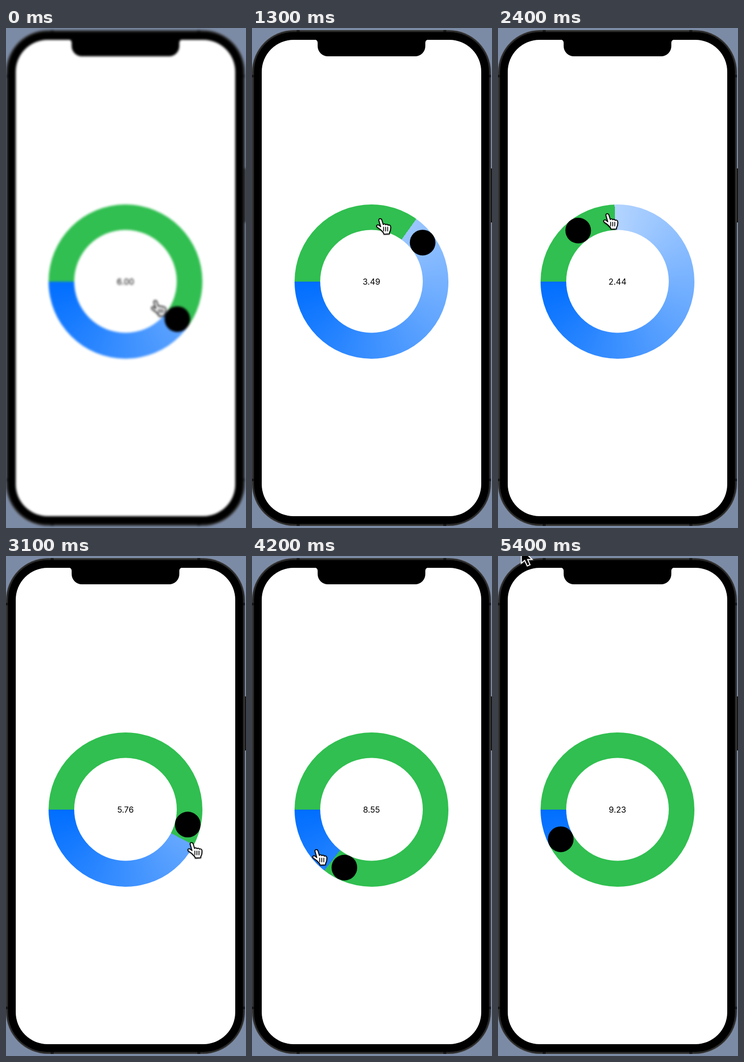
These frames come from a looping animation (468x972 px, 5500 ms). An HTML page:

```html
<!DOCTYPE html>
<html lang="en">
<head>
<meta charset="utf-8">
<title>Ring slider</title>
<style>
  html, body { margin: 0; width: 100%; height: 100%; overflow: hidden; background: #7c8ba5; }
  svg { display: block; width: 468px; height: 972px; }
  #ring { width: 300px; height: 300px; border-radius: 50%; }
  text { font: 16px Inter, "Liberation Sans", sans-serif; text-anchor: middle; }
</style>
</head>
<body>
<svg id="stage" viewBox="0 0 468 972">
  <rect x="-20" y="-20" width="508" height="1012" fill="#7c8ba5"/>

  <!-- phone -->
  <rect x="465" y="273" width="4" height="105" rx="1" fill="#111"/>
  <rect x="0" y="4" width="466" height="964" rx="82" fill="#434343"/>
  <rect x="1" y="5" width="464" height="962" rx="81" fill="#292929"/>
  <g fill="#151515">
    <path d="M0 91h5v5H0zM461 91h5v5h-5zM0 876h5v5H0zM461 876h5v5h-5z"/>
    <path d="M87 4h6v5h-6zM373 4h6v5h-6zM87 963h6v5h-6zM373 963h6v5h-6z"/>
  </g>
  <rect x="4" y="8" width="458" height="956" rx="77"/>
  <rect x="19" y="23" width="428" height="926" rx="62" fill="#fff"/>
  <path d="M122 22.5Q128 23 128 29V35A20 20 0 0 0 148 55H318A20 20 0 0 0 338 35V29Q338 23 344 22.5Z"/>

  <!-- slider -->
  <foreignObject x="83" y="342.5" width="300" height="300"><div id="ring"></div></foreignObject>
  <circle cx="233" cy="492.5" r="100" fill="#fff"/>
  <text id="label" x="233" y="498.6">6.00</text>
  <circle id="knob" r="25"/>

  <!-- cursors -->
  <g id="hand" stroke-linecap="round" stroke-linejoin="round">
    <path id="palm" d="M-2.6 3C-3 -.6 2.2 -1 3.2 2.6L6 11.5C7.4 9.6 10 9.8 10.8 12C12.2 10.4 14.6 10.6 15.4 13C17.4 11.4 20.2 13 20.4 15.6C20.8 20 20 24 18 27.4L18 29.6L7.4 30.2L6.6 27.6C3 23 .4 20.4 -5 17.4C-9 14.4 -6.4 11.2 -3 12.4L1 15.6Z"
      fill="#fff" stroke="#000" stroke-width="1.8"/>
    <path d="M6.6 16.5V24M10.6 16.5V24M14.6 16.5V24" stroke="#000" stroke-width="1.6"/>
  </g>
  <path id="arrow" d="M0 0V28L6.5 22.5L11.5 33.5L17 31L12.3 20.8H21Z" stroke="#fff" stroke-width="2"/>
</svg>
<script>
const LOOP = 5500, STEP = 100;
const CX = 233, CY = 492.5, TRACK = 125;
const $ = id => document.getElementById(id);

// [time, slider value]
const VALUE = [
  [0, 6], [700, 6], [900, 5.3], [1200, 3.97], [1300, 3.49], [1600, 1.9], [1900, .8],
  [2100, .75], [2300, 1.45], [2400, 2.44], [2600, 3.6], [3000, 5.38], [3100, 5.76],
  [3600, 7], [4100, 8.195], [4200, 8.55], [4400, 9.05], [4600, 9.28], [4800, 9.23]
];

// [time, dial position, distance from the centre]
const DRAG = [
  [0, 5.91, 69], [500, 5.92, 120], [700, 5.9, 120], [900, 4.9, 122], [1300, 2.72, 123],
  [1600, 1.2, 124], [1900, .5, 125], [2100, .6, 128], [2300, 1.6, 131], [2400, 2.26, 133],
  [3100, 5.74, 144], [4200, 9, 133], [4500, 9.36, 126], [4700, 9.25, 125], [4900, 9.25, 125]
];

// start, end and end point of the pointer's exit
const LEAVE = { from: 4900, to: 5400, x: 45.5, y: -14 };

function sample(keys, t) {
  if (t <= keys[0][0]) return keys[0].slice(1);
  for (let i = 1; i < keys.length; i++) {
    const a = keys[i - 1], b = keys[i];
    if (t <= b[0]) {
      const k = (t - a[0]) / (b[0] - a[0]);
      return a.slice(1).map((v, j) => v + (b[j + 1] - v) * k);
    }
  }
  return keys[keys.length - 1].slice(1);
}

// Position 0..10 runs clockwise from the left end of the dial.
function polar(pos, r) {
  const a = pos * Math.PI / 5;
  return [CX - r * Math.cos(a), CY - r * Math.sin(a)];
}

function pointer(t) {
  const [x, y] = polar(...sample(DRAG, t));
  const k = Math.min(1, Math.max(0, (t - LEAVE.from) / (LEAVE.to - LEAVE.from)));
  const e = k * k * (3 - 2 * k);
  return [x + (LEAVE.x - x) * e, y + (LEAVE.y - y) * e];
}

function place(el, [x, y], shown = true) {
  el.setAttribute("transform", `translate(${x.toFixed(2)} ${y.toFixed(2)})`);
  el.style.display = shown ? "" : "none";
}

function draw(t) {
  const [value] = sample(VALUE, t);
  const [lagged] = sample(VALUE, t - 100);
  const angle = value * 36;
  $("ring").style.background =
    `conic-gradient(from 270deg, #30bf50 ${angle}deg, transparent ${angle}deg),` +
    "conic-gradient(from 270deg, #edf5ff, #006eff)";
  $("label").textContent = value.toFixed(2);
  place($("knob"), polar(lagged, TRACK));

  const tip = pointer(t), onScreen = tip[1] > 23;
  place($("hand"), tip, onScreen);
  place($("arrow"), tip, !onScreen);

  const blur = t < 100 ? 2 : t < 200 ? .8 : 0;
  $("stage").style.filter = blur ? `blur(${blur}px)` : "none";
}

$("palm").style.filter = "drop-shadow(0 1px 1px rgba(0,0,0,.4))";
const start = performance.now();
function tick() {
  const t = (performance.now() - start + 5) % LOOP;
  draw(Math.floor(t / STEP) * STEP);
  requestAnimationFrame(tick);
}
tick();
</script>
</body>
</html>
```
